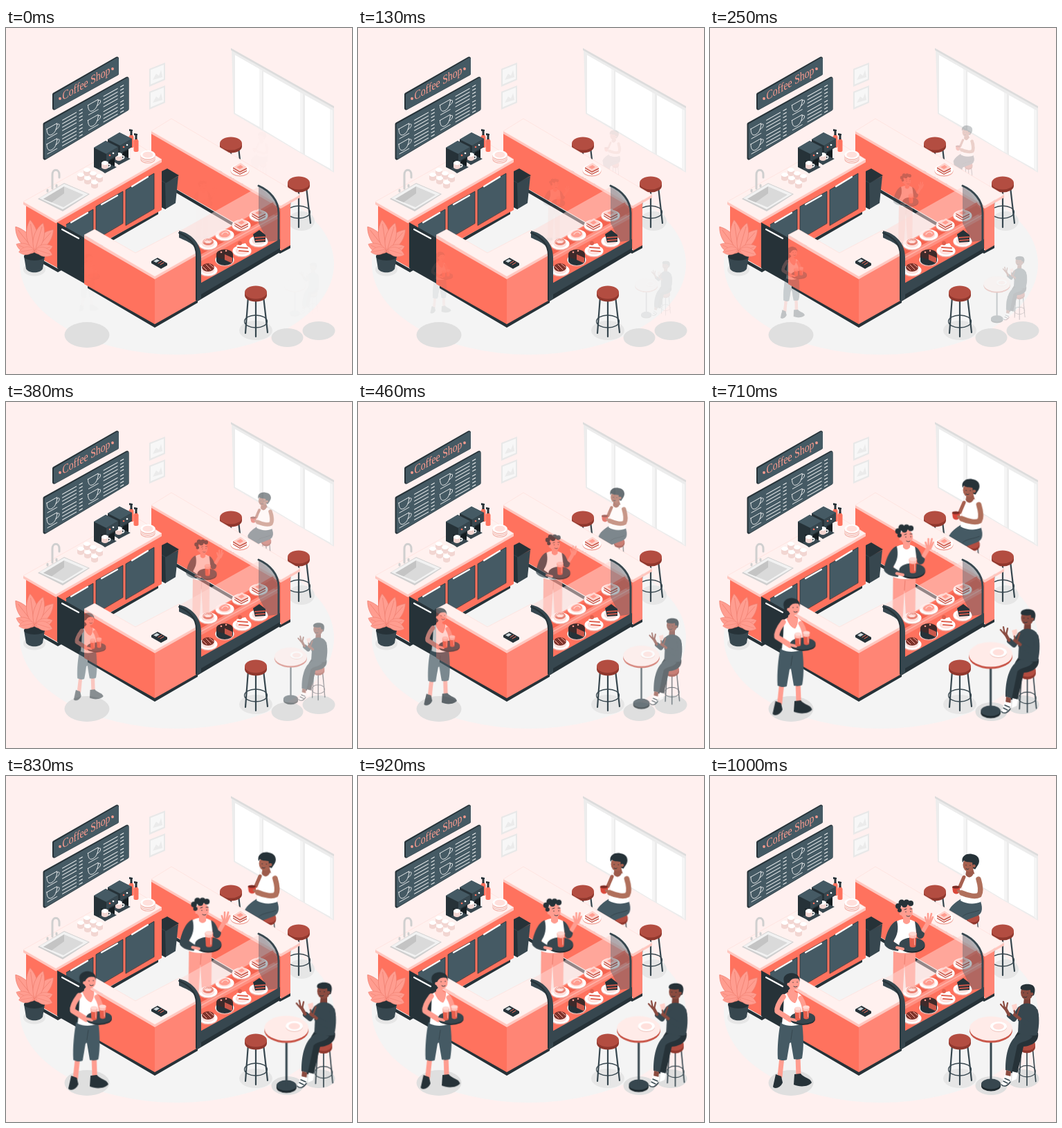
Recreate the animation shown at these times as an HTML page. Size 500 by 500 pixels, loop 1.04 s.

```html
<!DOCTYPE html>
<html lang="en">
<head>
<meta charset="utf-8">
<title>Coffee shop</title>
<style>
html, body { margin: 0; width: 100%; height: 100%; overflow: hidden; background: #fff0ef; }
svg { display: block; width: 100%; height: 100%; }
.coral { fill: #ff725e; }
.soft { fill: #ff8575; }
.pale { fill: #fff1ef; stroke: #ffdcd7; stroke-width: .6; }
.edge { fill: #ffc6be; }
.pink { fill: #ff9d90; }
.dark { fill: #263238; }
.slate { fill: #37474f; }
.steel { fill: #455a64; }
.white { fill: #fff; }
.shade { fill: #e6e6e6; }
.under { fill: #dfdfdf; }
.line { fill: none; stroke-linecap: round; stroke-linejoin: round; }
.face { stroke: #263238; stroke-width: .9; }
/* people pop in with a small overshoot, then rest until the loop ends */
.pop { animation: pop 1040ms infinite; }
@keyframes pop {
  0% { opacity: .015; transform: scale(.505); animation-timing-function: cubic-bezier(.36, -.01, .5, 1.38); }
  93.3%, 100% { opacity: 1; transform: scale(1); }
}
</style>
</head>
<body>
<svg viewBox="0 0 500 500" xmlns="http://www.w3.org/2000/svg">
<defs>
  <g id="stool">
    <path class="line" stroke="#37474f" stroke-width="2.2" d="M-11 6L-15 59M0 10V64M11 6L17 58"/>
    <ellipse class="line" stroke="#37474f" stroke-width="1.3" cy="42" rx="16.5" ry="9"/>
    <path fill="#8f372d" d="M-16 0v4a16 9.5 0 0 0 32 0v-4z"/>
    <ellipse fill="#b34d41" rx="16" ry="9.5"/>
  </g>
  <g id="plate">
    <ellipse cy="1.5" rx="13.5" ry="8" fill="#f0a79d"/>
    <ellipse class="white" rx="13.5" ry="8"/>
    <ellipse rx="9.5" ry="5.5" fill="#ffe0dc"/>
  </g>
  <g id="sandwich">
    <use href="#plate"/>
    <path fill="#c9574a" d="M-10-4l10 6v5l-10-6zM0 2l10-5v5L0 7z"/>
    <path class="white" d="M-10-2l10 6 10-5v1.5L0 5.500l-10-6z"/>
    <path fill="#ffd2cb" d="M-10-4L1-10l9 6L0 2z"/>
    <path class="pink" d="M-5-4l6-3 4 3-5 3z"/>
  </g>
  <g id="cup">
    <path fill="#f2d6d2" d="M-5-4v6a5 3 0 0 0 10 0v-6z"/>
    <ellipse class="white" cy="-4" rx="5" ry="3"/>
  </g>
  <g id="drink">
    <path fill="#e85f4d" d="M-4.700-8l1 16a4 2.200 0 0 0 7.500 0l1-16z"/>
    <path fill="#ffc1b8" d="M-4.700-8l.4 5a5 2 0 0 0 8.600 0l.4-5z"/>
    <ellipse fill="#ffd8d2" cy="-8" rx="4.800" ry="2.500"/>
    <path class="line" stroke="#ffb3a8" d="M2-4l.5 10"/>
  </g>
  <g id="item" class="line" stroke="#fff" stroke-width=".8">
    <path d="M0 0h17c0 7-3 12-8.500 12s-8.500-5-8.500-12zM17 2c6-1 5 7-2 6M1 14.500h16"/>
    <path stroke-width="1.100" d="M26 0h23M26 5h23M26 10h23M26 15h23M54 0h5M54 5h5M54 10h5M54 15h5"/>
  </g>
  <g id="machine">
    <path class="dark" d="M0 11L17 1l18 9v12l-5 3v13l-14 9-16-8z"/>
    <path class="steel" d="M0 11L17 1l18 9-17 10z"/>
    <path class="slate" d="M18 20l17-10v11l-17 10z"/>
    <path fill="#151d21" d="M10 29l8 3 12-6v12l-14 5z"/>
    <path class="slate" d="M7 41l14-7 12 5-17 9z"/>
    <path class="line" stroke="#78909c" d="M17 33l4-2"/>
    <use href="#cup" x="16" y="37"/>
    <path class="line" stroke="#fff" stroke-width="1.500" d="M21 35c4-1 3 4 0 4"/>
    <circle cx="23" cy="22" r="1.300" class="coral"/><circle cx="28" cy="19" r="1.300" class="white"/>
  </g>
  <g id="frame">
    <path fill="#e8e8e8" d="M0 9L23 0v25L0 35z"/>
    <path fill="#f7f7f7" d="M2 10.500L21 3v20.500L2 31.500z"/>
    <path fill="#ebebeb" d="M5 25l5-9 4 3 3-8 2 9v1z"/>
  </g>
  <g id="bottle">
    <path class="coral" d="M-3.500 2v14a3.500 2 0 0 0 7 0V2l-2-3h-3z"/>
    <path class="dark" d="M-1.500-6h3V0h-3zM-3-9l5 1v2h-5z"/>
  </g>
  <g id="leaf">
    <path d="M0 0c-10-8-12-28 0-42 11 14 10 34 0 42z"/>
    <path class="line" d="M0-2v-34"/>
  </g>
</defs>

<ellipse cx="247" cy="341" rx="227" ry="131" fill="#f4f4f4"/>
<g class="shade">
  <ellipse cx="41" cy="349" rx="16" ry="9.500"/>
  <ellipse cx="427" cy="279" rx="19" ry="14"/>
  <ellipse cx="361" cy="437" rx="24" ry="14"/>
</g>
<g class="under">
  <ellipse cx="117" cy="443.500" rx="32.500" ry="18.500"/>
  <ellipse cx="406.500" cy="447.500" rx="23" ry="13.500"/>
  <ellipse cx="452" cy="437.500" rx="23.500" ry="13.500"/>
</g>

<!-- window -->
<path fill="#ececec" d="M326 31L474 116V209L329 124z"/>
<path fill="#dcdcdc" d="M325 29l149 84v3L325 32z"/>
<path class="white" d="M331 39l35 20v84l-35-20zM372 63l53 30v86l-53-32zM432 97l36 20v86l-36-20z"/>
<path fill="#f5f5f5" d="M366 59l4 2v85l-4-3zM425 93l4 2v86l-4-2zM468 117l4 2v88l-4-4z"/>

<use href="#frame" x="207" y="50"/>
<use href="#frame" x="207" y="83"/>

<!-- signs -->
<g stroke-linejoin="round" stroke-width="5">
  <path fill="#263238" stroke="#263238" d="M69.500 96l91-52v22l-91 50z"/>
  <path fill="#455a64" stroke="#455a64" stroke-width="4" d="M71 97l90-52v21L71 115.500z"/>
  <path fill="#263238" stroke="#263238" d="M56 139l119-66v44L56 188z"/>
  <path fill="#455a64" stroke="#455a64" stroke-width="4" d="M57.500 140l118-66v43l-118 70z"/>
</g>
<text transform="matrix(.81 -.455 0 1.05 81.500 104.500)" font-family="'Liberation Serif', 'Noto Serif', serif" font-size="17" fill="#ff9d90">Coffee Shop</text>
<circle cx="78" cy="102" r="1.900" class="pink"/><circle cx="154" cy="59" r="1.900" class="pink"/>
<use href="#item" transform="matrix(.87 -.49 0 1 59 146)"/>
<use href="#item" transform="matrix(.87 -.49 0 1 59 168)"/>
<use href="#item" transform="matrix(.87 -.49 0 1 118.500 111.500)"/>
<use href="#item" transform="matrix(.87 -.49 0 1 118.500 133.500)"/>

<use href="#stool" x="325" y="167"/>
<use href="#stool" x="423" y="224"/>

<!-- guest at the window -->
<g class="pop" style="transform-origin:363px 188px">
  <use href="#stool" transform="translate(380 204) scale(.58 .8)"/>
  <path class="steel" d="M362 178l29 3c4 12 2 19-7 22l-18 7-4 32-9-1-8-46c4-9 11-13 17-17z"/>
  <path class="line" stroke="#37474f" d="M389 194c-9 4-18 3-24 9"/>
  <path fill="#9c5a4a" d="M371 133l9 1 3 10-8 5-6-5z"/>
  <path class="white" d="M365 143l4-1c3 6 9 6 12-1l6 4 4 37c-9 4-21 3-29-2l3-16z"/>
  <path class="line" stroke="#b0705c" stroke-width="7.500" d="M388 149c3 10 4 18 1 23-5 3-16 1-25-3"/>
  <path class="line" stroke="#a76150" stroke-width="5" d="M367 146l-6 14"/>
  <path fill="#d9483b" d="M350 160l11 1v6c-2 5-9 4-10 0z"/>
  <ellipse cx="355.500" cy="160.500" rx="5.500" ry="2" fill="#7b2b24"/>
  <path class="line" stroke="#b0705c" stroke-width="4" d="M363 168l-4-2"/>
  <ellipse cx="374" cy="128.500" rx="8.500" ry="10" fill="#a76150"/>
  <path class="dark" d="M365 125c-3-9 6-14 14-12 10 1 12 10 8 16l-4 6-3-2-1-8c-5-1-9 0-12-3z"/>
  <circle cx="381.500" cy="130" r="2.300" fill="#a76150"/>
  <path class="line face" d="M370 128.500v.6M376 129v.6M370 134c2 1 3 1 4 0"/>
</g>

<!-- long counter -->
<path class="dark" d="M215 215l181 106 15-8v5l-15 8-181-106z"/>
<path class="coral" d="M210 150l188 108v62L210 212z"/>
<path class="soft" d="M397 257l14-8v65l-14 8z"/>
<path class="edge" d="M210 149l187 108 28-16v4l-28 16-187-108z"/>
<path class="pale" d="M210 149l29-18 186 110-28 16z"/>
<use href="#sandwich" x="338" y="205"/>

<!-- bin -->
<path class="slate" d="M223 216l8 7 18-9-4 39-15 9-7-4z"/>
<path class="dark" d="M222 220l8 4 1 38-8-4zM221 209l12-6 17 10-19 11-10-6z"/>

<!-- sink counter -->
<path class="dark" d="M29 322l46 26 145-84v5L75 353 29 327z"/>
<path class="coral" d="M29 256l46 26v65l-46-26z"/>
<path class="coral" d="M74 280l151-88v71L74 346z"/>
<path class="steel" d="M87 284l39-22v66l-39 20zM130 258l39-22v46l-39 23zM173 234l41-24v51l-41 24z"/>
<path class="line" stroke="#263238" stroke-width=".8" d="M87 284l39-22v66M130 305v-47l39-22v46zM173 285v-51l41-24v51z"/>
<path class="line" stroke="#fff" stroke-width="2.200" d="M94 281l24-14M138 255l23-13M182 229l23-14"/>
<path class="dark" d="M74 281l39 22v66l-39-22z"/>
<path class="line" stroke="#fff" stroke-width="2.200" d="M81 291l24 13"/>
<path class="edge" d="M25 251l47 27 153-88v4L72 282l-47-27z"/>
<path class="pale" d="M25 251l157-88 43 27L72 278z"/>
<path fill="#cfcfcf" d="M46 247l38-23 37 16-39 25z"/>
<path fill="#f2f2f2" d="M48 246l36-21 35 15-37 22z"/>
<path fill="#dadada" d="M54 247l30-18 28 12-29 18z"/>
<path fill="#c4c4c4" d="M54 247l30-18v10l-18 13z"/>
<path class="line" stroke="#cfcfcf" stroke-width="3" d="M67 232v-20c0-9 10-9 10 0v4M60 234v2M73 227v2"/>
<g>
  <use href="#cup" x="117" y="209"/><use href="#cup" x="126" y="214"/><use href="#cup" x="135" y="218"/>
  <use href="#cup" x="108" y="216"/><use href="#cup" x="118" y="221"/><use href="#cup" x="128" y="227"/>
</g>
<use href="#bottle" x="181" y="155"/><use href="#bottle" x="188" y="161"/>
<use href="#machine" x="147" y="150"/><use href="#machine" x="127" y="162"/>
<g transform="translate(205 188) scale(.8)">
  <use href="#plate"/><use href="#plate" y="-3"/><use href="#plate" y="-6"/>
</g>

<!-- plant -->
<path class="slate" d="M26 330l3 18c4 7 20 7 24 0l3-18z"/>
<ellipse cx="41" cy="330" rx="15" ry="6" class="dark"/>
<g stroke="#ee7d6e" stroke-width=".7" class="pink">
  <use href="#leaf" transform="translate(41 322) rotate(-38) scale(1 1.050)"/>
  <use href="#leaf" transform="translate(41 322) rotate(42) scale(1 .98)"/>
  <use href="#leaf" transform="translate(41 322) rotate(-8) scale(1 1.080)"/>
  <use href="#leaf" transform="translate(42 322) rotate(16) scale(.9 1)"/>
  <use href="#leaf" transform="translate(41 324) rotate(-66) scale(.8 .68)"/>
  <use href="#leaf" transform="translate(41 324) rotate(72) scale(.8 .66)"/>
  <use href="#leaf" transform="translate(40 320) rotate(-100) scale(.7 .52)"/>
  <use href="#leaf" transform="translate(43 320) rotate(108) scale(.8 .6)"/>
</g>

<!-- waiter behind the case -->
<g class="pop" style="transform-origin:286px 263px">
  <path class="pink" d="M265 248h32l-1 92h-11l-4-68-4 68h-13z"/>
  <path class="line" stroke="#ee7d6e" d="M281 272l1-14"/>
  <path class="dark" d="M262 338h15v7h-18zM285 338h12l4 7h-16z"/>
  <path class="white" d="M267 212c8-7 23-7 31 0l-1 41c-9 4-23 4-32 0z"/>
  <path class="line" stroke="#ff9d90" stroke-width="6" d="M305 229l10-17"/>
  <path class="line" stroke="#ff9d90" stroke-width="2.500" d="M314 213l-3-9M315 211v-12M317 211l3-12M318 213l4-9"/>
  <path class="slate" d="M270 209c-10 4-16 20-18 33 0 6 10 10 20 11l2-8-9-6c6-9 8-18 5-30zM296 210c5 2 8 8 10 14l4 3c0 8-7 11-11 5z"/>
  <path class="pink" d="M279 202h10v9c-3 4-7 4-10 0z"/>
  <ellipse cx="292" cy="245.500" rx="18.500" ry="10" fill="#1e292e"/>
  <ellipse cx="292" cy="243.500" rx="18.500" ry="10" class="slate"/>
  <path class="line" stroke="#ff9d90" stroke-width="4" d="M270 248l9 2"/>
  <use href="#drink" transform="translate(293 237) scale(1.150)"/>
  <ellipse cx="284" cy="196" rx="9" ry="10" class="pink"/>
  <g class="dark">
    <circle cx="272" cy="188" r="4"/><circle cx="277" cy="183" r="4.500"/><circle cx="284" cy="182.500" r="4"/>
    <circle cx="290" cy="184" r="4"/><circle cx="274" cy="194" r="3"/><circle cx="281" cy="186" r="4"/>
  </g>
  <circle cx="276" cy="199" r="2.300" class="pink"/>
  <path class="line face" d="M283 196v.7M290 195.500v.7M284 202c2 1.500 4 1 5 0M281 193l3-1M289 192h3"/>
</g>

<!-- front counter -->
<path class="dark" d="M118 370l97 56 62-35v6l-62 36-97-57z"/>
<path class="coral" d="M113 302l102 60v66l-102-58z"/>
<path class="soft" d="M215 362l60-35v67l-60 34z"/>
<path class="edge" d="M113 299l102 59 60-34v5l-60 34-102-59z"/>
<path class="pale" d="M113 299l15-8 59 34 63-33 25 17v16l-60 34z"/>
<path class="dark" d="M210 337l9-5 14 8-9 6zM210 337v3l14 8 9-5v-3l-9 6z"/>
<path fill="#cfd8dc" d="M213 337l5-3 4 2-5 3z"/>
<path class="line" stroke="#ff725e" d="M220 340l5-3M223 342l5-3"/>

<!-- display case -->
<path class="coral" d="M276 314l109-62 10 12v47l-117 64z"/>
<path fill="#ff8f80" d="M279 326l104-60 11 9-114 63z"/>
<path fill="#f5634f" d="M279 318l106-62 10 9-115 63z"/>
<path class="line" stroke="#ffb0a5" stroke-width="1.500" d="M281 332l113-62"/>
<use href="#plate" x="292" y="312"/>
<g class="line" stroke="#e88274" stroke-width="3"><ellipse cx="292" cy="309" rx="6.500" ry="3.500"/></g>
<path class="line" stroke="#ffd2cb" d="M286 308l3-3M294 306l4 2"/>
<use href="#plate" x="316" y="299"/>
<path class="pink" d="M308 299c0-8 15-9 16-2 0 6-13 8-16 2z"/>
<path class="line" stroke="#ffd2cb" stroke-width="1.500" d="M312 298c3-4 7-4 9-1"/>
<use href="#sandwich" x="340" y="285"/><use href="#sandwich" x="365" y="271"/>
<use href="#plate" x="292" y="350"/>
<ellipse cx="292" cy="346" rx="9" ry="6" fill="#7d332b"/>
<path class="line" stroke="#ffb0a5" d="M285 345l5 5M289 342l7 7M294 341l6 5"/>
<use href="#plate" x="316" y="335"/>
<path class="dark" d="M304 327v9a12 7 0 0 0 24 0v-9z"/>
<ellipse cx="316" cy="327" rx="12" ry="7" fill="#3e2a2a"/>
<path fill="#c9574a" d="M316 327l11 5v8l-11-5z"/>
<circle cx="311" cy="324" r="1.300" class="pink"/><circle cx="318" cy="322" r="1.300" class="pink"/>
<use href="#plate" x="341" y="322"/>
<path class="white" d="M333 314l13-3 5 8v6l-14-1z"/>
<path class="line" stroke="#e0604e" stroke-width="2" d="M335 317l14 1M337 322l13 1"/>
<circle cx="338" cy="311" r="3" fill="#e0604e"/>
<use href="#plate" x="365" y="308"/>
<path class="dark" d="M357 298l9-6 9 7v10l-15 1z"/>
<path class="line" stroke="#c9574a" stroke-width="1.800" d="M360 303l14-1M361 307l13-1"/>
<path fill="#ffdad5" opacity=".5" d="M250 294l114-64c9 5 16 12 21 22l-109 64c-5-9-14-17-26-22z"/>
<path fill="#455a64" opacity=".42" d="M365 229c15 6 29 20 29 38v40l-15 2-14-27z"/>
<path class="line" stroke="#37474f" stroke-width="3" d="M365 228c16 7 29 21 29 39v40"/>
<path class="slate" d="M277 371l119-66v17l-119 70z"/>
<path class="dark" d="M275 389l121-71v6l-121 72z"/>
<path class="slate" d="M250 293c16 3 32 17 32 38v60l-7 4v-70c0-12-12-16-25-22z"/>
<path class="line" stroke="#263238" stroke-width="2" d="M250 296c14 6 25 16 25 32v65"/>

<use href="#stool" x="361" y="382"/>

<!-- waitress -->
<g class="pop" style="transform-origin:120px 368px">
  <path class="line" stroke="#ff9d90" stroke-width="7" d="M104 406l-3 28M127 406l1 28"/>
  <path class="dark" d="M95 431l8 3 2 9c-3 8-12 10-14 6zM122 431l9-1c4 6 14 6 16 13-4 6-17 7-26 3z"/>
  <path class="steel" d="M102 356h31c2 17 3 36 0 52-3 2-9 2-12 1l-4-24-2 1-4 24c-4 2-9 1-13-1-1-18 1-38 4-53z"/>
  <path class="line" stroke="#37474f" d="M117 381l2-14"/>
  <path class="pink" d="M113 302h9v9l9 7c-3 6-21 6-26-1l8-5z"/>
  <path class="white" d="M107 316l4-2c3 9 9 14 12 14 3-4 4-9 4-15l5 4 2 21-2 20c-9 4-20 4-28 0l2-20z"/>
  <path class="pink" d="M111 314c3 9 9 14 12 14 3-4 4-9 4-15z"/>
  <path class="line" stroke="#ff9d90" stroke-width="7.500" d="M106 319c-6 8-10 15-9 21l19 12"/>
  <path class="line" stroke="#ff9d90" stroke-width="7" d="M131 321c5 8 6 14 6 22"/>
  <ellipse cx="134" cy="351.500" rx="18" ry="8.500" class="dark"/>
  <ellipse cx="134" cy="349.500" rx="18" ry="8.500" class="slate"/>
  <path class="line" stroke="#ff9d90" stroke-width="4" d="M115 351l9 2"/>
  <use href="#drink" x="127" y="344"/><use href="#drink" x="139" y="342"/>
  <path class="dark" d="M107 298c-3-9 5-14 13-13 8 1 11 8 9 13l-13 8c-2 4-6 7-12 5 4-3 4-8 3-13z"/>
  <ellipse cx="121" cy="299" rx="8.500" ry="10" class="pink"/>
  <path class="dark" d="M109 299c0-13 15-16 20-6-6-1-10-1-13 3l-3 5z"/>
  <circle cx="113.500" cy="301" r="2.200" class="pink"/>
  <path class="line face" d="M120 298v.7M126 297.500v.7M121 304c2 1.500 3 1 5 0"/>
</g>

<!-- guest at the table -->
<g class="pop" style="transform-origin:429px 378px">
  <use href="#stool" transform="translate(458 388) scale(.75 .92)"/>
  <path fill="#1e292e" d="M392 445v3a14 7.500 0 0 0 28 0v-3z"/>
  <ellipse cx="406" cy="445" rx="14" ry="7.500" class="slate"/>
  <path class="line" stroke="#37474f" stroke-width="3" d="M406 378v66"/>
  <path class="dark" d="M446 368l28 3c2 13-9 19-21 20l-9 39-10-1c-4-20-2-41 12-61z"/>
  <path class="slate" d="M449 372l17 4c-4 8-17 7-22 13l-8 38-9-2c0-24 5-46 22-53z"/>
  <path fill="#8a4b40" d="M428 425l7 2-1 8-7-1z"/>
  <path class="white" d="M426 432l9 2c1 5-1 9-4 12-5 4-9 2-9-2zM437 427l8 2-2 9-7 3z"/>
  <path class="line" stroke="#37474f" stroke-width="1.500" d="M426 437l7 3M424 441l6 3M421 446c4 4 9 2 13-4"/>
  <path fill="#7a4037" d="M454 319h9v11h-10z"/>
  <path class="slate" d="M447 333c6-6 17-6 24 1 6 11 5 26 2 40-9 3-21 1-28-3z"/>
  <path class="line" stroke="#37474f" stroke-width="8" d="M448 337l-9 14-6-5M470 340c3 14 0 22-6 21l-15-9"/>
  <path class="line" stroke="#8a4b40" stroke-width="4.500" d="M432 345l-5-9M448 351l-8-6"/>
  <path class="line" stroke="#8a4b40" stroke-width="2.200" d="M426 337l-6-7M426 336l-2-10M428 337l2-9M441 346l-2-10M443 347l4-12"/>
  <path fill="#ffd2cb" d="M436 331l7-2 1 7-6 3z"/>
  <path fill="#c9574a" d="M375 365v3a31 17.500 0 0 0 62 0v-3z"/>
  <ellipse cx="406" cy="365" rx="31" ry="17.500" fill="#ffebe8"/>
  <ellipse cx="417" cy="363" rx="12" ry="7" fill="#efc3bc"/>
  <ellipse cx="417" cy="362" rx="12" ry="7" class="white"/>
  <ellipse cx="417" cy="362" rx="8" ry="4.500" fill="#ffe0dc"/>
  <ellipse cx="458" cy="313" rx="9" ry="10.500" fill="#8a4b40"/>
  <path class="dark" d="M449 308c-2-6 6-8 13-7 8 1 9 8 6 16l-4 1-1-9c-4 1-10 1-14-1z"/>
  <circle cx="465" cy="315" r="2.300" fill="#8a4b40"/>
  <path class="line face" d="M453 313v.7M459 313.500v.7M453 319c2 1.500 4 1 5 0"/>
</g>
</svg>
</body>
</html>
```
